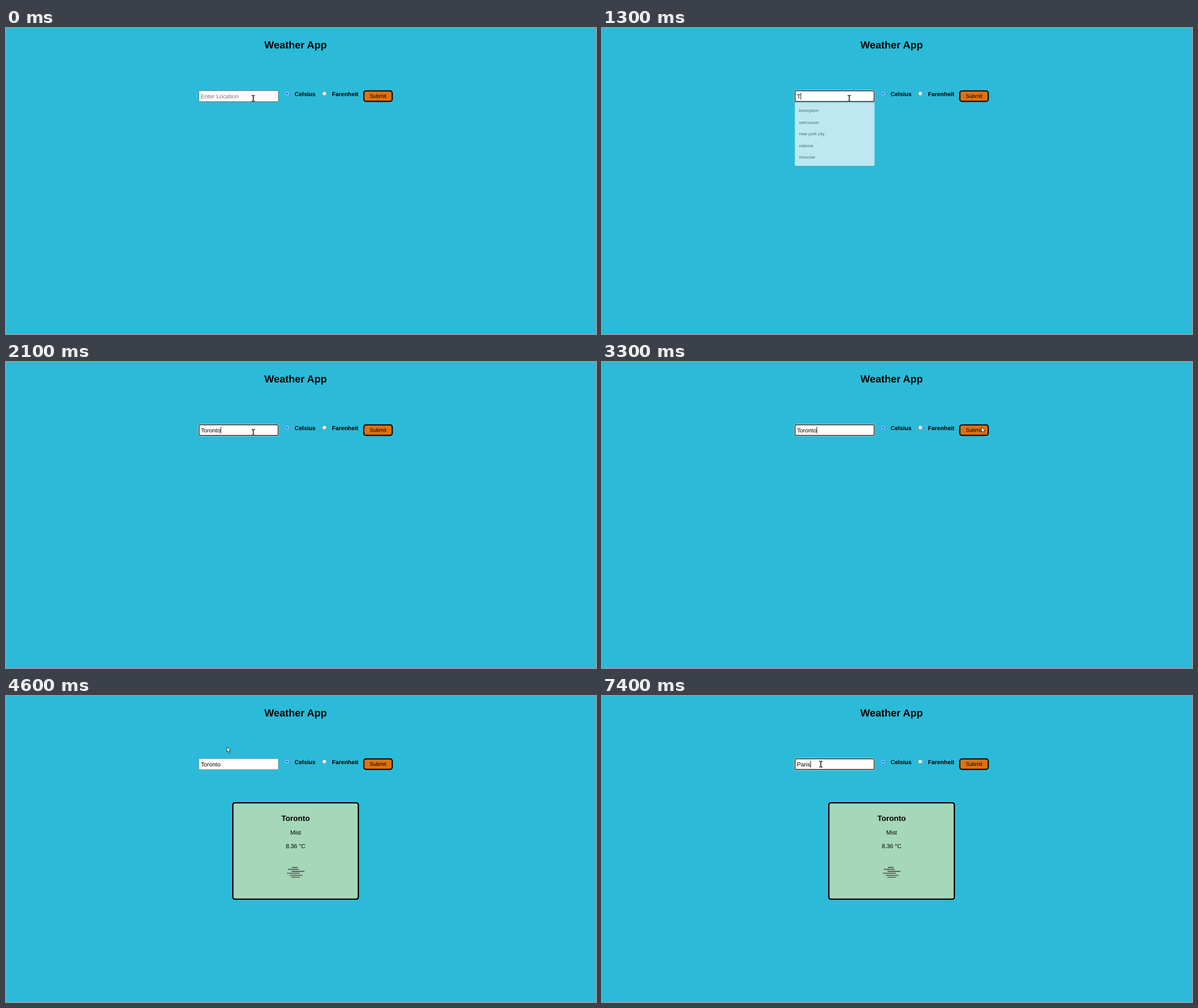
An HTML page for the animation above (8000 ms loop, 1038x539 px).

```html
<!DOCTYPE html>
<html lang="en">
<head>
<meta charset="utf-8">
<title>Weather App</title>
<style>
  html, body { margin: 0; width: 100%; height: 100%; overflow: hidden; background: #2bbbd8; }
  svg { display: block; width: 1038px; height: 539px; }
  text { font: 10.35px "Liberation Sans", Arial, sans-serif; text-rendering: geometricPrecision; white-space: pre; }
  .bold { font-weight: bold; }
  .mid { text-anchor: middle; }
  #menu text { font: 7.33px "Noto Sans", "Open Sans", sans-serif; fill: #444; }
</style>
</head>
<body>
<svg viewBox="0 0 1038 539">
  <defs>
    <filter id="shadow" x="-5%" y="-5%" width="110%" height="110%">
      <feDropShadow dx="0" dy=".5" stdDeviation=".6" flood-opacity=".3"/>
    </filter>
  </defs>

  <text class="bold mid" x="509.5" y="36" style="font-size:18px">Weather App</text>

  <!-- location field -->
  <rect id="halo" x="338.4" y="109.4" width="141.6" height="21.2" rx="2" fill="#fff"/>
  <rect id="field" fill="#fff"/>
  <rect id="mark" x="343" y="114" height="12" fill="#3b87e3"/>
  <text id="value" y="123.5"></text>
  <rect id="caret" y="114" width=".9" height="12"/>

  <!-- unit choice -->
  <g fill="#fff">
    <circle cx="494.3" cy="115.5" r="3.4" stroke="#0a6cff" stroke-width=".7"/>
    <circle cx="494.3" cy="115.5" r="2.1" fill="#0a6cff"/>
    <circle cx="560.1" cy="115.5" r="3.4" stroke="#767676" stroke-width=".6"/>
  </g>
  <text class="bold" x="507.8" y="119.5">Celsius</text>
  <text class="bold" x="573.4" y="119.5">Farenheit</text>

  <rect x="629.5" y="110.8" width="50" height="18.4" rx="3.6" fill="#e07010" stroke="#000" stroke-width="2"/>
  <text class="mid" x="654.5" y="123" style="font-size:9.3px">Submit</text>

  <g id="menu">
    <path id="sheet" fill="#fcfcfc" filter="url(#shadow)"/>
    <g id="items"></g>
  </g>

  <!-- result -->
  <g id="card">
    <rect x="399.1" y="188.1" width="220.8" height="169.8" rx="3.6" fill="#a5d7b9" stroke="#000" stroke-width="2.3"/>
    <g id="report">
      <text class="bold mid" x="509.5" y="220.3" style="font-size:13.5px">Toronto</text>
      <text class="mid" x="509.5" y="244.4">Mist</text>
      <text class="mid" x="509.5" y="267.8">8.36 °C</text>
    </g>
    <path id="mist" stroke="#4c5650" stroke-width="1.6" stroke-linecap="round"/>
  </g>

  <!-- pointers, hot spots at the local origin -->
  <g id="beam" fill="none" stroke-linecap="round">
    <path d="M-2 -5Q0 -5 0 -3.6V3.6Q0 5 -2 5M2 -5Q0 -5 0 -3.6M0 3.6Q0 5 2 5" stroke="#222" stroke-width="2"/>
    <path d="M-1.8 -5Q0 -5 0 -3.6V3.6Q0 5 -1.8 5M1.8 -5Q0 -5 0 -3.6M0 3.6Q0 5 1.8 5" stroke="#bbb" stroke-width=".6"/>
  </g>
  <path id="arrow" d="M.4 .4V9.4L2.5 7.5L4 11.3L5.8 10.5L4.2 6.9H7.3Z" fill="#fff" stroke="#111" stroke-width=".8" stroke-linejoin="round"/>
</svg>
<script>
const LOOP = 8000;
const $ = id => document.getElementById(id);
const attrs = (el, map) => { for (const k in map) el.setAttribute(k, map[k]); };
const show = (el, on) => { el.style.display = on ? "" : "none"; };

const cities = ["brampton", "vancouver", "new york city", "odense", "moscow"];
cities.forEach((name, i) => {
  const row = document.createElementNS("http://www.w3.org/2000/svg", "text");
  attrs(row, { x: 345.4, y: 147.5 + i * 20.5 });
  row.textContent = name;
  $("items").append(row);
});

const strokes = [[503.6, 512.4], [496.6, 514.6], [502.8, 524.4], [494.8, 516.4], [499.6, 521.2], [502.8, 516.4]];
$("mist").setAttribute("d", strokes.map(([a, b], i) => `M${a} ${301.9 + i * 3.47}H${b}`).join(""));

// Each step changes only the properties it names.
const start = {
  text: "", focus: false, hover: true, caret: false, mark: false,
  menu: 0, slide: 0, card: false, report: false, icon: false,
  pointer: "beam", at: [435, 124]
};
const steps = [
  [0, {}],
  [500, { focus: true, caret: true, menu: 1 }],
  [1100, { caret: false }],
  [1300, { text: "T", caret: true, menu: .7, slide: .4 }],
  [1400, { menu: .24, slide: 1 }],
  [1500, { text: "To", menu: 0 }],
  [1700, { text: "Tor" }],
  [1800, { text: "Toro" }],
  [1900, { text: "Toron" }],
  [2100, { text: "Toronto" }],
  [2800, { caret: false, hover: false, pointer: "arrow", at: [499.4, 97.2] }],
  [3300, { caret: true, at: [667.2, 114.2] }],
  [3600, { focus: false, caret: false, card: true }],
  [3900, { report: true }],
  [4600, { icon: true, at: [388.2, 89.2] }],
  [4900, { at: [382.2, 93.2] }],
  [5200, { hover: true, pointer: "beam", at: [385, 114] }],
  [5400, { at: [385, 120] }],
  [5700, { focus: true, mark: true }],
  [6700, { text: "Pa", mark: false, caret: true }],
  [7100, { text: "Pari" }],
  [7400, { text: "Paris" }]
];
let state = start;
const timeline = steps.map(([time, change]) => [time, state = { ...state, ...change }]);

function drawField(s) {
  const value = $("value");
  const empty = !s.text;
  value.textContent = s.text || "Enter Location";
  attrs(value, {
    x: empty && !s.focus ? 342.3 : 342.9,
    fill: s.mark ? "#fff" : empty ? "#757575" : "#000"
  });
  const line = s.focus ? 1.3 : .7;
  attrs($("field"), {
    x: 339 + line / 2, y: 110 + line / 2, width: 140.4 - line, height: 20 - line,
    rx: s.focus ? 1.2 : .3, "stroke-width": line,
    stroke: s.focus ? "#101010" : s.hover ? "#4f4f4f" : "#767676"
  });
  show($("halo"), s.focus);
  const width = empty ? 0 : value.getComputedTextLength();
  attrs($("mark"), { width });
  show($("mark"), s.mark);
  attrs($("caret"), { x: 343 + width });
  show($("caret"), s.caret);
}

function drawMenu(s) {
  show($("menu"), s.menu > 0);
  $("menu").style.opacity = s.menu;
  const left = 338.2 + 2.8 * s.slide;
  const top = 130.8 + 1.7 * s.slide;
  const bottom = 242.3 + 1.7 * s.slide;
  $("sheet").setAttribute("d",
    `M${left} ${top}H479.4V${bottom - 2}q0 2 -2 2H${left + 2}q-2 0 -2 -2Z`);
  $("items").setAttribute("transform", `translate(${2.7 * s.slide} ${2.2 * s.slide})`);
}

function draw(s) {
  drawField(s);
  drawMenu(s);
  show($("card"), s.card);
  show($("report"), s.report);
  $("report").setAttribute("transform", `translate(0 ${s.icon ? 0 : 28.1})`);
  show($("mist"), s.icon);
  for (const id of ["beam", "arrow"]) {
    show($(id), id === s.pointer);
    $(id).setAttribute("transform", `translate(${s.at})`);
  }
}

let drawn = null;
function tick() {
  const time = performance.now() % LOOP;
  const current = timeline.findLast(([from]) => from <= time)[1];
  if (current !== drawn) draw(drawn = current);
  requestAnimationFrame(tick);
}
tick();
</script>
</body>
</html>
```
